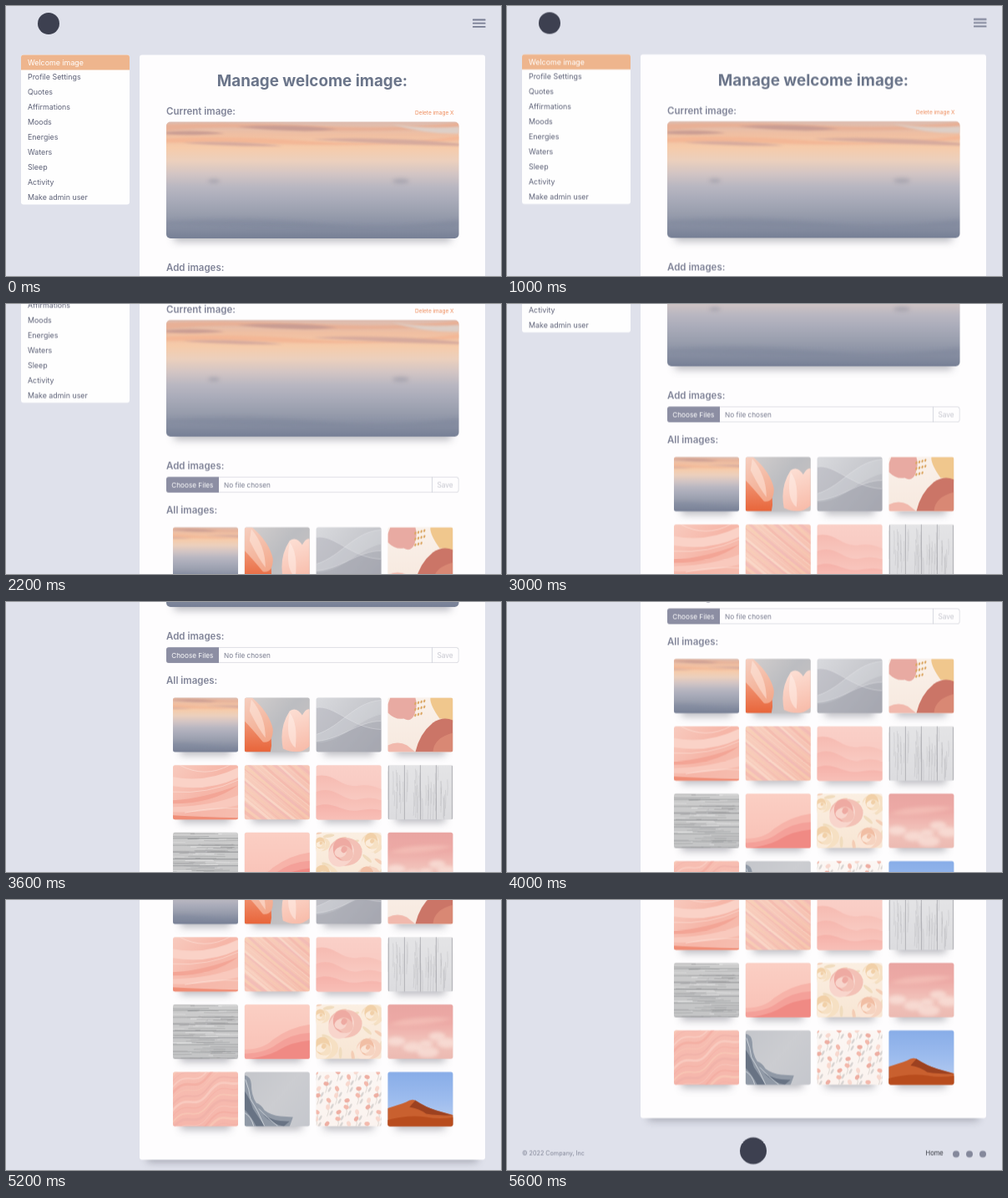
Write an HTML page with a canvas that moves like this. It is 593 px wide and 323 px high and loops after 6 s.

```html
<!DOCTYPE html>
<html lang="en">
<head>
<meta charset="utf-8">
<title>Manage welcome image</title>
<style>
html, body { margin: 0; width: 100%; height: 100%; overflow: hidden; background: #dfe1eb; }
#stage { position: relative; width: 100%; height: 100%; overflow: hidden; contain: strict; }
#page { position: absolute; left: 0; top: 0; width: 593px; height: 796px; will-change: transform; }
canvas { position: absolute; left: 0; top: 0; }
span { position: absolute; line-height: 20px; margin-top: -10px; white-space: pre; font-family: Inter, "Open Sans", sans-serif; }
</style>
</head>
<body>
<div id="stage"><div id="page"><canvas id="art" width="593" height="796"></canvas></div></div>
<script>
const page = document.getElementById('page');
const ctx = document.getElementById('art').getContext('2d');

function label(text, x, y, size, color, weight = 400, centered = false) {
  const el = document.createElement('span');
  el.textContent = text;
  el.style.cssText = `left:${x}px;top:${y}px;font-size:${size}px;color:${color};font-weight:${weight}`;
  if (centered) el.style.transform = 'translateX(-50%)';
  page.append(el);
}

function box(x, y, w, h, r, color) {
  ctx.beginPath();
  ctx.roundRect(x, y, w, h, r);
  ctx.fillStyle = color;
  ctx.fill();
}

function dot(x, y, r, color, ry = r, turn = 0) {
  ctx.beginPath();
  ctx.ellipse(x, y, r, ry, turn, 0, Math.PI * 2);
  ctx.fillStyle = color;
  ctx.fill();
}

function shape(color, d) {
  ctx.fillStyle = color;
  ctx.fill(new Path2D(d));
}

function stroke(color, width, d) {
  ctx.strokeStyle = color;
  ctx.lineWidth = width;
  ctx.stroke(new Path2D(d));
}

function ramp(x0, y0, x1, y1, ...colors) {
  const g = ctx.createLinearGradient(x0, y0, x1, y1);
  colors.forEach((c, i) => g.addColorStop(i / (colors.length - 1), c));
  return g;
}

function shadow(x, y, w, h, drop) {
  ctx.save();
  ctx.shadowColor = 'rgba(70,72,85,.36)';
  ctx.shadowBlur = 10;
  ctx.shadowOffsetY = drop;
  box(x + 9, y + 9, w - 18, h - 10, 3, '#999');
  ctx.restore();
}

// Clipped and slightly softened, like a photograph
function picture(x, y, w, h, r, draw) {
  shadow(x, y, w, h, 5);
  ctx.save();
  ctx.beginPath();
  ctx.roundRect(x, y, w, h, r);
  ctx.clip();
  ctx.translate(x, y);
  ctx.filter = 'blur(.5px)';
  draw();
  ctx.restore();
}

function random(seed) {
  return () => (seed = (seed * 16807) % 2147483647) / 2147483647;
}

const W = 78, H = 65;
const cover = color => box(-4, -4, W + 8, H + 8, 0, color);
const fill = (...colors) => cover(ramp(0, 0, 0, H, ...colors));
const slant = (...colors) => cover(ramp(0, 0, W, H, ...colors));

function sunrise() {
  box(-9, -9, 369, 158, 0, ramp(0, 0, 0, 140,
    '#dcbcb0', '#f0bfa2', '#f6cbaa', '#ecd0bd', '#d3c5c4', '#b9b7c1', '#a9abb9', '#9a9fae', '#8990a3', '#767f95'));
  ctx.filter = 'blur(1.2px)';
  shape('#e8b096', 'M0 3 Q90 0 180 5 T351 1 V7 Q240 14 150 9 T0 11Z');
  shape('#c99d93', 'M85 6 Q150 2 205 9 Q160 14 85 6Z M0 12 Q40 9 70 14 Q30 17 0 15Z');
  shape('#f3b796', 'M0 20 Q80 16 170 23 T351 17 V22 Q250 30 150 27 T0 25Z');
  shape('#d6aa9d', 'M175 21 Q260 17 351 26 V29 Q260 27 175 21Z M20 25 Q80 22 140 29 Q70 30 20 25Z');
  shape('#ddcfc7', 'M270 3 Q310 9 351 6 V14 Q310 15 270 3Z');
  ctx.filter = 'blur(2px)';
  dot(57, 71, 7, 'rgba(132,134,152,.4)', 2.5);
  dot(281, 71, 10, 'rgba(132,134,152,.4)', 3);
  shape('rgba(88,100,128,.14)', 'M0 119 Q90 112 180 121 T351 117 V125 Q170 129 0 123Z');
}

function miniSunrise() {
  ctx.translate(-42, 0);
  ctx.scale(H / 140, H / 140);
  sunrise();
}

function tulips() {
  slant('#d5d0cf', '#bcbdc1', '#cbc4c3');
  shape(ramp(0, 20, 0, H, '#f3a183', '#e8653a'), 'M0 10 Q15 25 27 36 Q35 50 31 65 H0Z');
  shape(ramp(0, 0, 30, 60, '#f6cfc0', '#f3a384'), 'M0 0 H9 Q30 18 34 38 Q34 55 22 53 Q8 36 0 28Z');
  shape('rgba(255,235,225,.5)', 'M8 2 Q25 22 25 48 Q17 38 6 16Z');
  shape(ramp(45, 12, 65, H, '#fde3d9', '#f8bcaa'), 'M46 61 Q41 36 54 16 Q62 10 69 21 Q74 12 78 14 V58 Q66 70 46 61Z');
  shape('rgba(255,242,236,.5)', 'M54 18 Q64 30 61 60 Q48 50 54 18Z');
}

function greyWaves() {
  slant('#d9dade', '#c8c9ce', '#b6b7be');
  shape('rgba(160,162,172,.35)', 'M0 12 C22 8 42 37 78 38 V65 H0Z');
  shape('rgba(226,227,232,.3)', 'M0 44 C30 35 45 5 78 3 V20 C48 27 30 55 0 54Z');
  shape('rgba(145,147,158,.28)', 'M0 52 C30 50 50 28 78 28 V65 H0Z');
  stroke('rgba(240,240,244,.6)', .6, 'M0 12 C22 8 42 37 78 38 M0 44 C30 35 45 5 78 3 M0 52 C30 50 50 28 78 28');
}

function abstract() {
  fill('#faf1ea', '#f7e9df');
  shape('#e8aaa2', 'M3 0 H33 Q36 9 32 20 Q28 30 19 25 Q9 27 0 18 V8Z');
  shape('#f0c78d', 'M51 0 H78 V30 Q70 25 62 25 Q50 8 51 0Z');
  shape('#f1b9ad', 'M0 57 Q12 51 23 57 L33 65 H0Z');
  shape('#cb7567', 'M33 65 Q38 43 54 30 Q66 22 78 27 V65Z');
  shape('rgba(230,151,128,.55)', 'M54 65 Q55 48 78 42 V65Z');
  for (let i = 0; i < 11; i++) dot(33 + (i % 4) * 3.6, 7 + Math.floor(i / 4) * 7 - i % 4, 1.1, '#dca866', 1.8, .4);
}

function brush() {
  slant('#f8cabe', '#f6b6a8', '#f6bdaf');
  shape('#fad2c7', 'M0 14 Q38 22 78 3 V15 Q42 32 0 25Z');
  shape('#f3a596', 'M0 42 Q37 40 78 24 Q48 46 0 46Z');
  shape('#f9c9bd', 'M0 50 Q45 49 78 36 V48 Q35 58 0 56Z');
  shape('#ef8d76', 'M0 60 Q35 62 78 63 V69 H0Z');
  stroke('rgba(255,237,230,.5)', 1, 'M0 32 Q42 35 78 18 M8 0 Q38 16 68 0 M14 57 Q48 50 78 52');
}

function streaks() {
  slant('#f8cfbd', '#f7c6b8', '#f6bfac');
  const rnd = random(41), tones = ['#fbdcc9', '#f2ada4', '#f9d3b2', '#eeb2b6', '#fde8da'];
  ctx.globalAlpha = .45;
  for (let i = 0; i < 24; i++) {
    const x = -76 + i * 6;
    stroke(tones[i % 5], .6 + rnd() * 3, `M${x} -3 Q${x + 36} ${24 + rnd() * 8} ${x + 86} 68`);
  }
  ctx.globalAlpha = 1;
}

function pinkWaves() {
  fill('#fad0c8', '#f8c5bd');
  shape(ramp(0, 10, 0, 45, '#f6bab1', '#f9cbc3'), 'M0 13 C22 9 28 26 48 25 Q64 22 78 29 V69 H0Z');
  shape(ramp(0, 28, 0, 60, '#f6b7ae', '#f9c8c0'), 'M0 32 C22 23 32 44 50 41 Q65 37 78 42 V69 H0Z');
  shape(ramp(0, 42, 0, H, '#f5aea6', '#f8bfb7'), 'M0 49 C22 42 30 58 52 54 Q68 51 78 54 V69 H0Z');
}

function planks() {
  fill('#e4e4e6', '#dcdcdf');
  const rnd = random(9);
  for (let i = 0; i < 44; i++) {
    const x = rnd() * W, y = rnd() * 40;
    stroke('rgba(145,145,152,.3)', .6, `M${x} ${y} q1 10 0 ${15 + rnd() * 24}`);
  }
  for (let x = 1; x < W; x += 19) stroke('#a6a7ac', .8, `M${x} -2 V67`);
}

function boards() {
  fill('#cdcdcd', '#c4c5c6');
  const rnd = random(77);
  for (let i = 0; i < 75; i++) {
    const tone = i % 3 ? 'rgba(120,121,124,.35)' : 'rgba(240,240,240,.6)';
    stroke(tone, .5 + rnd() * .6, `M${rnd() * 65 - 12} ${rnd() * H} q14 ${rnd() * 2 - 1} ${18 + rnd() * 28} 0`);
  }
  for (let y = 7; y < H; y += 8.2) stroke('#8f9093', .7, `M-2 ${y} H80`);
}

function hills() {
  fill('#fbcfc4', '#f9c1b6');
  shape('#f7b3a9', 'M0 54 Q22 54 34 42 Q55 27 78 24 V69 H0Z');
  shape('#f4a099', 'M0 59 Q25 58 38 48 Q56 35 78 34 V69 H0Z');
  shape('#f08a84', 'M0 66 Q29 62 42 54 Q57 45 78 43 V69 H0Z');
}

function rose(x, y, r, tones) {
  for (let k = 0; k < 6; k++) {
    const a = k * 2.3, s = r * (1 - k * .16);
    dot(x + Math.cos(a) * r * .15, y + Math.sin(a) * r * .15, s, tones[k % 3], s * .84, a);
  }
}

function roses() {
  fill('#fbefe2', '#f8e6d4');
  for (let i = 0; i < 16; i++) dot((i * 31) % W, (i * 23) % H, 7, i % 2 ? '#f0dcbe' : '#f4cdb5', 2, i);
  const cream = ['#f6e0c3', '#fbecdb', '#f1d0a8'], pink = ['#f3c1b6', '#f8d5cc', '#eeaaa2'];
  rose(8, 52, 16, cream);
  rose(66, 12, 14, cream);
  rose(61, 53, 15, ['#f6d3c0', '#fbe5d6', '#f1bea4']);
  rose(5, 14, 10, cream);
  rose(32, 23, 20, pink);
}

function clouds() {
  fill('#e9a5a2', '#edaaa6', '#f2c3bb', '#ecbab2');
  ctx.filter = 'blur(2px)';
  [[10, 44, 11], [30, 51, 12], [46, 47, 8], [59, 38, 10], [71, 46, 12], [48, 57, 13]]
    .forEach(([x, y, r]) => dot(x, y, r, 'rgba(250,230,223,.65)', r * .5));
  shape('rgba(247,200,191,.6)', 'M0 24 Q30 12 78 17 Q35 28 0 24Z');
}

function marble() {
  fill('#f7beb2', '#f6b6ab');
  const tones = ['#fad3c8', '#f3a99e', '#f9cdb9', '#efb0a8'];
  ctx.globalAlpha = .65;
  for (let i = 0; i < 21; i++) {
    const y = -34 + i * 7;
    stroke(tones[i % 4], i % 3 + .8, `M-2 ${y + 26} C18 ${y} 24 ${y + 27} 42 ${y + 4} S64 ${y - 4} 80 ${y - 9}`);
  }
  ctx.globalAlpha = 1;
}

function fabric() {
  slant('#c4c6cb', '#cccdd1', '#c5c7cd');
  shape('#9099a6', 'M0 4 Q7 5 8 14 Q8 28 14 37 Q20 39 24 46 Q32 52 43 53 L58 54 L54 65 L50 69 H0Z');
  shape('#687384', 'M0 23 Q7 33 10 44 L24 65 H14 Q8 53 0 45Z M22 51 Q36 60 54 59 L47 65 Q32 62 22 51Z');
  stroke('#d3d8de', .9, 'M1 9 Q6 22 7 32 Q16 46 24 65 M17 44 Q28 56 40 65 M0 49 Q8 53 11 65');
}

function floral() {
  fill('#fcf7f4', '#fbf3ef');
  for (let i = 0; i < 35; i++) {
    const x = (i % 7) * 12 + (i * 5) % 4, y = Math.floor(i / 7) * 14 + (i % 2) * 6;
    stroke('#d3cdc8', .7, `M${x} ${y} q2 6 -1 11`);
    dot(x + 4, y + 7, 1.3, '#d9d5d3', 3.4, .5);
    dot(x, y, 2.4, ['#f3b9ac', '#f8d8ce', '#eeaea2'][i % 3], 3.2, i);
  }
}

function desert() {
  fill('#88ade8', '#9dbcee', '#bccff0');
  shape('#c9602f', 'M-2 44 Q14 39 22 36 Q28 32 33 34 Q45 42 58 46 L80 52 V69 H-2Z');
  shape('#9c4120', 'M33 34 Q45 42 58 46 L78 52 Q58 52 46 50 Q38 44 26 42Z');
  shape('#b84c1d', 'M-2 58 Q24 51 46 54 Q62 57 80 54 V69 H-2Z');
}

// Header and sidebar
dot(51, 21, 13, '#3d4050');
[16.5, 20.7, 24.9].forEach(y => box(559, y - .9, 15.5, 1.8, .5, '#777c92'));
box(18, 58.5, 130, 179, 3, '#fefefe');
box(18, 58.5, 130, 18, [3, 3, 0, 0], '#eeb58d');
['Welcome image', 'Profile Settings', 'Quotes', 'Affirmations', 'Moods', 'Energies', 'Waters', 'Sleep', 'Activity', 'Make admin user']
  .forEach((t, i) => label(t, 26, 67.5 + i * 17.9, 8.9, i ? '#5d6177' : '#fff'));

// Card
shadow(160, 58.5, 414, 675, 4);
box(160, 58.5, 414, 675, 3, '#fefdfe');
label('Manage welcome image:', 367, 90, 18.8, '#6b758a', 700, true);
label('Current image:', 192, 125.5, 11.5, '#808498', 600);
label('Delete image X', 490, 127.5, 6.5, '#ee8a58');
picture(192, 138.5, 350.5, 139.5, 5, sunrise);

label('Add images:', 192, 313, 11.5, '#808498', 600);
box(192, 326.3, 350.5, 18.7, 3, '#d6d7de');
box(192.7, 327, 349.1, 17.3, 2.5, '#fefdfe');
box(192, 326.3, 63, 18.7, [3, 0, 0, 3], '#8c8ea3');
box(510, 326.3, .8, 18.7, 0, '#cfd0d8');
label('Choose Files', 198.3, 335.5, 8.2, '#fff');
label('No file chosen', 261, 335.5, 8.2, '#777b8e');
label('Save', 516.5, 335.5, 8.3, '#c6c7cf');
label('All images:', 192, 365.8, 11.5, '#808498', 600);

[miniSunrise, tulips, greyWaves, abstract, brush, streaks, pinkWaves, planks,
  boards, hills, roses, clouds, marble, fabric, floral, desert]
  .forEach((draw, i) => picture(200 + (i % 4) * 85.8, 386.5 + Math.floor(i / 4) * 80.67, W, H, 2.5, draw));

// Footer
label('© 2022 Company, Inc', 18, 776, 7.2, '#7f8395');
dot(295, 772.5, 16, '#3d4050');
label('Home', 501.5, 776, 7.6, '#34373f');
[538, 554, 570].forEach(x => dot(x, 776.5, 4, '#84889b'));

// Scroll flicks: start, duration, end position
const flicks = [[1000, 600, 58], [1800, 600, 127], [2600, 600, 213], [3400, 600, 318.5], [4300, 600, 394], [5100, 500, 472.5]];

function scrollAt(t) {
  let y = 0;
  for (const [start, span, end] of flicks) {
    if (t < start) break;
    const rest = 1 - Math.min(1, (t - start) / span);
    y += (end - y) * (1 - .99 * rest * rest);
  }
  return y;
}

const begin = performance.now();
function tick() {
  const t = (performance.now() - begin) % 6000;
  page.style.transform = `translateY(${-scrollAt(Math.floor(t / 100) * 100)}px)`;
  requestAnimationFrame(tick);
}
tick();
</script>
</body>
</html>
```
